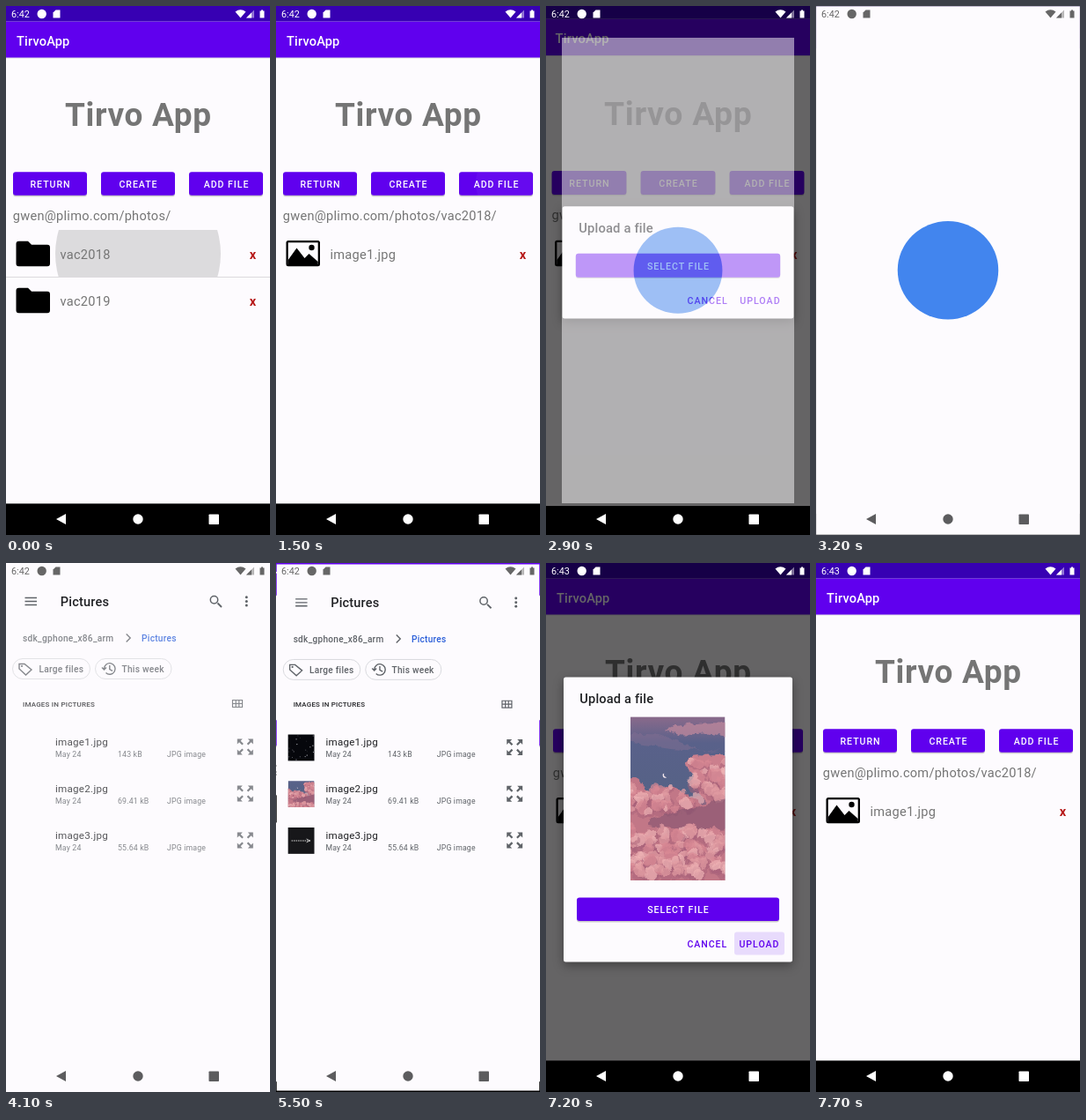
Animation, 300 px wide and 600 px high, one loop 8000 ms. Source, as an HTML page:

```html
<!DOCTYPE html>
<html lang="en">
<head>
<meta charset="utf-8">
<title>File upload demo</title>
<style>
html, body { margin: 0; width: 100%; height: 100%; overflow: hidden; background: #fdfbfe; }
svg { display: block; }
#stage { width: 300px; height: 600px; }
text { font-family: Roboto, "Liberation Sans", sans-serif; white-space: pre; }
#panel { filter: drop-shadow(0 4px 6px rgba(0, 0, 0, .35)); }
</style>
</head>
<body>
<svg id="stage" viewBox="0 0 300 600"></svg>
<script>
const LOOP = 8000, STEP = 100;
const PAPER = '#fdfbfe', PURPLE = '#6000ee', GRAY = '#757575', INK = '#202124', SOFT = '#5f6368';
const $ = id => document.getElementById(id);

// Markup helpers
const text = (x, y, s, size, { fill = GRAY, weight = 400, gap = .0178, anchor = 'start', id = '' } = {}) =>
  `<text ${id && `id="${id}"`} x="${x}" y="${y}" font-size="${size}" font-weight="${weight}" fill="${fill}"
    letter-spacing="${gap * size}" text-anchor="${anchor}">${s}</text>`;
const rect = (x, y, w, h, fill, more = '') =>
  `<rect x="${x}" y="${y}" width="${w}" height="${h}" fill="${fill}" ${more}/>`;
const circle = (x, y, r, fill, more = '') =>
  `<circle cx="${x}" cy="${y}" r="${r}" fill="${fill}" ${more}/>`;
const path = (d, fill, more = '') => `<path d="${d}" fill="${fill}" ${more}/>`;
const line = (d, color, width) => path(d, 'none', `stroke="${color}" stroke-width="${width}"`);
const group = (id, body, more = '') => `<g id="${id}" ${more}>${body}</g>`;
const move = (x, y, body) => `<g transform="translate(${x} ${y})">${body}</g>`;

const label = (x, y, s, fill) =>
  text(x, y, s, 10.6, { fill, weight: 500, gap: .0893, anchor: 'middle' });
const button = (x, y, w, s) =>
  rect(x, y + 1, w, 27, '#000', 'rx="3" opacity=".2"') +
  rect(x, y, w, 26.6, PURPLE, 'rx="3"') + label(x + w / 2 + .5, y + 17.8, s, '#fff');

function random(seed) {
  return () => (seed = seed * 16807 % 2147483647) / 2147483647;
}

// Heap of cloud puffs inside a box, each lit from above
function puffs(seed, x, y, w, h, count) {
  const rnd = random(seed), lights = ['#f0b4b5', '#e39ca3', '#d98994'];
  let out = '';
  for (let i = 0; i < count; i++) {
    const cx = x + rnd() * w, cy = y + (i / count * .85 + rnd() * .15) * h, r = 3 + rnd() * 5;
    out += circle(cx + 1, cy + r * .7, r * 1.2, '#a8627a', 'opacity=".5"') +
      circle(cx, cy, r, lights[Math.floor(rnd() * 3)], 'opacity=".7"');
  }
  return out;
}

function sky(x, y, w, h, box) {
  return `<svg x="${x}" y="${y}" width="${w}" height="${h}" viewBox="${box}" preserveAspectRatio="xMidYMid slice">` +
    rect(0, 0, 107, 185, 'url(#dusk)') + '<g filter="url(#ragged)">' +
    path('M40 14Q70 4 117 8V24Q84 16 64 21Q50 22 40 14Z', '#c58a9f', 'opacity=".7"') +
    path('M-9 22Q30 14 60 30T117 34V38Q60 40 -9 28Z', '#8d7193', 'opacity=".4"') +
    path('M62 52Q68 42 80 44Q96 38 117 48V130H86Q74 112 84 96Q74 82 76 70Q62 66 62 52Z', '#cb7f8d') +
    puffs(11, 70, 47, 42, 50, 30) +
    path('M-9 74Q5 64 11 76Q20 86 28 84Q42 74 54 84Q68 88 77 98L117 96V195H-9Z', '#c27787') +
    puffs(29, -4, 78, 70, 30, 34) +
    path('M20 116Q60 106 117 90V126Q60 130 20 122Z', '#7d4f6c', 'opacity=".55"') +
    puffs(47, -4, 122, 115, 62, 110) + '</g>' +
    path('M38 64Q37 68 41 68.5Q36 70.5 36.5 65Z', '#f4e8ee') + '</svg>';
}

// System bars
const status =
  text(6, 13, '', 10.8, { fill: 'inherit', gap: 0, id: 'clock' }) + circle(40.7, 9, 5.2, 'inherit') +
  `<path d="M56.500 4.500H61.500V13.500H53.500V7.500Z"/>
   <path d="M260.500 6.500Q266.500 2 272.500 6.500L266.500 13.500Z"/>
   <path d="M273 13.500L282 4.500V13.500Z" opacity=".45"/><path d="M273 13.500L279 7.500V13.500Z"/>
   <path d="M288.500 5.500H290V4.500H292V5.500H293.500V13.500H288.500Z"/>`;
const nav =
  `<path d="M57 582L68 576V588Z"/><circle cx="150" cy="582" r="5.700"/>
   <rect x="230.500" y="576.500" width="11.500" height="11.500" rx=".8"/>`;

// Main screen
const folder = y => move(11.5, y,
  path('M3 0H13.500L17.500 4H35.500Q38.500 4 38.500 7V25.500Q38.500 28.500 35.500 28.500H3Q0 28.500 0 25.500V3Q0 0 3 0Z', '#000'));
const picture =
  rect(11.5, 266, 38.5, 29.2, '#000', 'rx="2.500"') + rect(13.8, 268.3, 33.9, 24.6, PAPER) +
  path('M13.800 288L23.500 274.500L32.500 286L37.500 281L47.700 290V293H13.800Z', '#000') + circle(40.5, 274, 3.2, '#000');
const entry = (y, s) => text(61.5, y, s, 14.58) +
  text(276.8, y, 'x', 14.58, { fill: '#b71c1c', weight: 700 });

const home =
  rect(0, 0, 300, 600, PAPER) + rect(0, 58, 300, 1.5, '#000', 'opacity=".1"') +
  rect(0, 17.5, 300, 41, PURPLE) + rect(0, 0, 300, 17.5, '#3700b3') + rect(0, 564.4, 300, 36, '#000') +
  text(12, 45, 'TirvoApp', 14.58, { fill: '#fff', weight: 500, gap: .0125 }) +
  text(150.3, 136.2, 'Tirvo App', 37, { weight: 700, anchor: 'middle' }) +
  button(8, 188.2, 84, 'RETURN') + button(108, 188.2, 84, 'CREATE') + button(208, 188.2, 84, 'ADD FILE') +
  circle(272, 201, 0, '#fff', 'id="addRipple" clip-path="url(#addClip)"') +
  text(7.8, 243, '', 14.58, { id: 'where' }) +
  group('folders', circle(150, 281, 94, '#000', 'id="rowRipple" clip-path="url(#rowClip)"') +
    folder(266.7) + entry(287, 'vac2018') + rect(0, 307, 300, 1, '#dcdadd') +
    folder(319.7) + entry(340, 'vac2019')) +
  group('photos', picture + entry(287, 'image1.jpg'));

const panel =
  rect(20, 0, 260, 126, PAPER, 'id="sheet" rx="2.500"') +
  text(38.3, 29.5, 'Upload a file', 14.58, { fill: INK, weight: 500, gap: .0125 }) +
  group('preview', sky(96, 45, 107.5, 185.5, '0 0 107 185')) +
  group('actions', button(35, 53, 230, 'SELECT FILE') +
    rect(35, 53, 230, 26.6, '#fff', 'rx="3" id="selectRipple"') +
    rect(214, 92, 57, 26, PURPLE, 'rx="3" id="uploadRipple"') +
    label(183.3, 109.2, 'CANCEL', PURPLE) + label(242.5, 109.2, 'UPLOAD', PURPLE));

// File picker
const arrow = (sx, sy) => `<path transform="scale(${sx} ${sy})" fill="${SOFT}" d="M9 9V3L6.800 5.200L3.500 1.900L1.900 3.500L5.200 6.800L3 9Z"/>`;
const expand = arrow(1, 1) + arrow(-1, 1) + arrow(1, -1) + arrow(-1, -1);
const bold = { weight: 500, fill: SOFT, gap: .025 };

function stars() {
  const rnd = random(77);
  let out = rect(0, 0, 30, 30, '#06070c');
  for (let i = 0; i < 26; i++)
    out += circle(rnd() * 29 + .5, rnd() * 29 + .5, .25 + rnd() * .5, '#dfe2ea', `opacity="${.3 + rnd() * .7}"`);
  return out;
}
const trace = rect(0, 0, 30, 30, '#17171a') +
  path('M4 15H26', 'none', 'stroke="#aaa" stroke-width="2" stroke-dasharray="1.500 1" opacity=".7"') +
  line('M21 13L25 15L21 17', '#ddd', .8);

const row = (i, name, size) => move(0, 53 * i,
  text(56, 207, name, 11.66, { fill: INK, gap: .02 }) +
  [[56, 'May 24'], [127, size], [183, 'JPG image']].map(([x, s]) => text(x, 220, s, 8.75, { fill: SOFT, gap: .02 })).join('') +
  move(271.8, 208.5, expand));

const chip = (x, w, s) =>
  rect(x, 108.5, w, 23, 'none', 'rx="11.500" stroke="#d5d6da" stroke-width=".9"') + text(x + 30, 123.8, s, 10.2, bold);

const tools =
  line('M21.500 39.500H35M21.500 43.500H35M21.500 47.500H35', SOFT, 1.3) +
  line('M240.500 45.500L245 50', SOFT, 1.8) + circle(236.5, 41.7, 4.2, 'none', `stroke="${SOFT}" stroke-width="1.500"`) +
  [38.7, 43.4, 48.1].map(y => circle(273.3, y, 1.5, SOFT)).join('');

const list =
  text(19, 88.5, 'sdk_gphone_x86_arm', 10.2, bold) + line('M136.700 80.500L141.200 85L136.700 89.500', SOFT, 1.4) +
  text(154, 88.5, 'Pictures', 10.2, { ...bold, fill: '#2b5fd9' }) +
  chip(7.5, 88, 'Large files') + chip(101.5, 86.5, 'This week') +
  line('M15 114.500H21L29 121L22.500 127L15 120Z', SOFT, 1.4) + circle(18, 117, 1.1, SOFT) +
  line('M111.500 120A6.300 6.300 0 1 1 113.500 124.600M109 118.500L111.500 121L114 118.500M117.800 116V120.500L121 122.300', SOFT, 1.4) +
  text(19, 162.8, 'IMAGES IN PICTURES', 8.02, { ...bold, fill: INK }) +
  line('M257.500 155.500H268.500V163.500H257.500ZM257.500 159.500H268.500M261.200 155.500V163.500M264.800 155.500V163.500', SOFT, 1.2) +
  row(0, 'image1.jpg', '143 kB') + row(1, 'image2.jpg', '69.41 kB') + row(2, 'image3.jpg', '55.64 kB');

const picker =
  rect(0, 0, 300, 600, PAPER) +
  `<ellipse id="splash" cx="150" cy="299.700" rx="57.300" ry="55.800" fill="#4285ee"/>` +
  group('heading', text(61.8, 49, 'Pictures', 14.58, { fill: INK, weight: 500, gap: .0125 })) +
  group('tools', tools) + group('list', list) +
  group('thumbs', move(13, 194, stars()) + sky(13, 247, 30, 30, '0 39 107 107') + move(13, 300, trace));

$('stage').innerHTML =
  `<defs>
    <linearGradient id="dusk" x2="0" y2="1"><stop stop-color="#8a6a8b"/><stop offset=".16" stop-color="#59618a"/>
      <stop offset=".45" stop-color="#566286"/><stop offset="1" stop-color="#b27d90"/></linearGradient>
    <filter id="ragged"><feTurbulence type="fractalNoise" baseFrequency=".09" numOctaves="3" seed="4" result="noise"/>
      <feDisplacementMap in="SourceGraphic" in2="noise" scale="9" xChannelSelector="R" yChannelSelector="G"/>
      <feGaussianBlur stdDeviation=".4"/></filter>
    <clipPath id="rowClip"><rect y="254" width="300" height="53"/></clipPath>
    <clipPath id="addClip"><rect x="208" y="188.200" width="84" height="26.600" rx="3"/></clipPath>
  </defs>` +
  group('app', home + rect(0, 0, 300, 600, '#000', 'id="dim"') + group('panel', panel)) +
  group('picker', picker) + group('status', status) + group('nav', nav);

// Linear value between [time, value] points
function track(t, ...points) {
  if (t <= points[0][0]) return points[0][1];
  for (let i = 1; i < points.length; i++) {
    const [t0, a] = points[i - 1], [t1, b] = points[i];
    if (t < t1) return a + (b - a) * (t - t0) / (t1 - t0);
  }
  return points[points.length - 1][1];
}
const set = (id, values) => Object.entries(values).forEach(([k, v]) => $(id).setAttribute(k, v));
function fade(id, v) {
  set(id, { opacity: v });
  $(id).style.display = v > 0 ? '' : 'none';
}
const zoom = (s, y = 300) => `translate(150 ${y}) scale(${s}) translate(-150 ${-y})`;

function draw(t) {
  const inFolder = t >= 200, chosen = t >= 5500, inPicker = t >= 3000 && t < 5600;
  $('clock').textContent = t < 7200 ? '6:42' : '6:43';
  $('where').textContent = 'gwen@plimo.com/photos/' + (inFolder ? 'vac2018/' : '');
  fade('folders', +!inFolder);
  fade('photos', +inFolder);
  set('rowRipple', { r: t < 100 ? 94 : 175, opacity: t < 100 ? .13 : .08 });
  set('addRipple', {
    r: track(t, [1400, 0], [1500, 45], [1700, 90]),
    opacity: track(t, [1400, 0], [1500, .04], [1600, .16], [1900, 0])
  });

  const shown = track(t, [1500, 0], [1600, .2], [1700, .65], [1800, .92], [1900, 1],
    [5400, 1], [5500, 0], [5600, .3], [5700, .7], [5800, .93], [5900, 1], [7600, 1], [7700, 0]);
  const extra = chosen ? 197 : 0, height = 126 + extra;
  fade('dim', shown * .6);
  fade('panel', shown);
  set('panel', { transform: `${zoom(.9 + .1 * shown, 291)} translate(0 ${291 - height / 2})` });
  set('sheet', { height });
  set('actions', { transform: `translate(0 ${extra})` });
  fade('preview', +chosen);
  set('selectRipple', { opacity: t >= 2700 && t < 3300 ? .2 : 0 });
  set('uploadRipple', { opacity: track(t, [6800, 0], [6900, .07], [7000, .13], [7200, .13], [7400, 0]) });

  set('app', {
    transform: zoom(track(t, [2800, 1], [2900, 1.01], [3000, 1.03], [3300, 1.05],
      [5400, 1.1], [5500, 1.09], [5600, 1.04], [5700, 1.012], [5800, 1.003], [5900, 1]))
  });
  fade('picker', track(t, [2800, 0], [2900, .5], [3000, 1], [5500, 1], [5600, 0]));
  set('picker', {
    transform: zoom(track(t, [2800, .85], [2900, .88], [3000, .95], [3100, .986], [3200, .9991], [3300, 1],
      [5400, 1], [5500, .995], [5600, .95]))
  });
  fade('splash', t < 3700 ? 1 : t < 3900 ? .5 : 0);
  fade('heading', +(t >= 3700));
  fade('tools', +(t >= 3900));
  fade('list', track(t, [3800, 0], [4200, 1]));
  fade('thumbs', track(t, [4100, 0], [4300, 1]));
  set('status', { fill: inPicker ? '#666' : '#fff' });
  set('nav', { fill: inPicker ? '#5c5c5e' : '#fff' });
}

function tick() {
  draw(Math.floor(performance.now() % LOOP / STEP) * STEP);
  requestAnimationFrame(tick);
}
tick();
</script>
</body>
</html>
```
